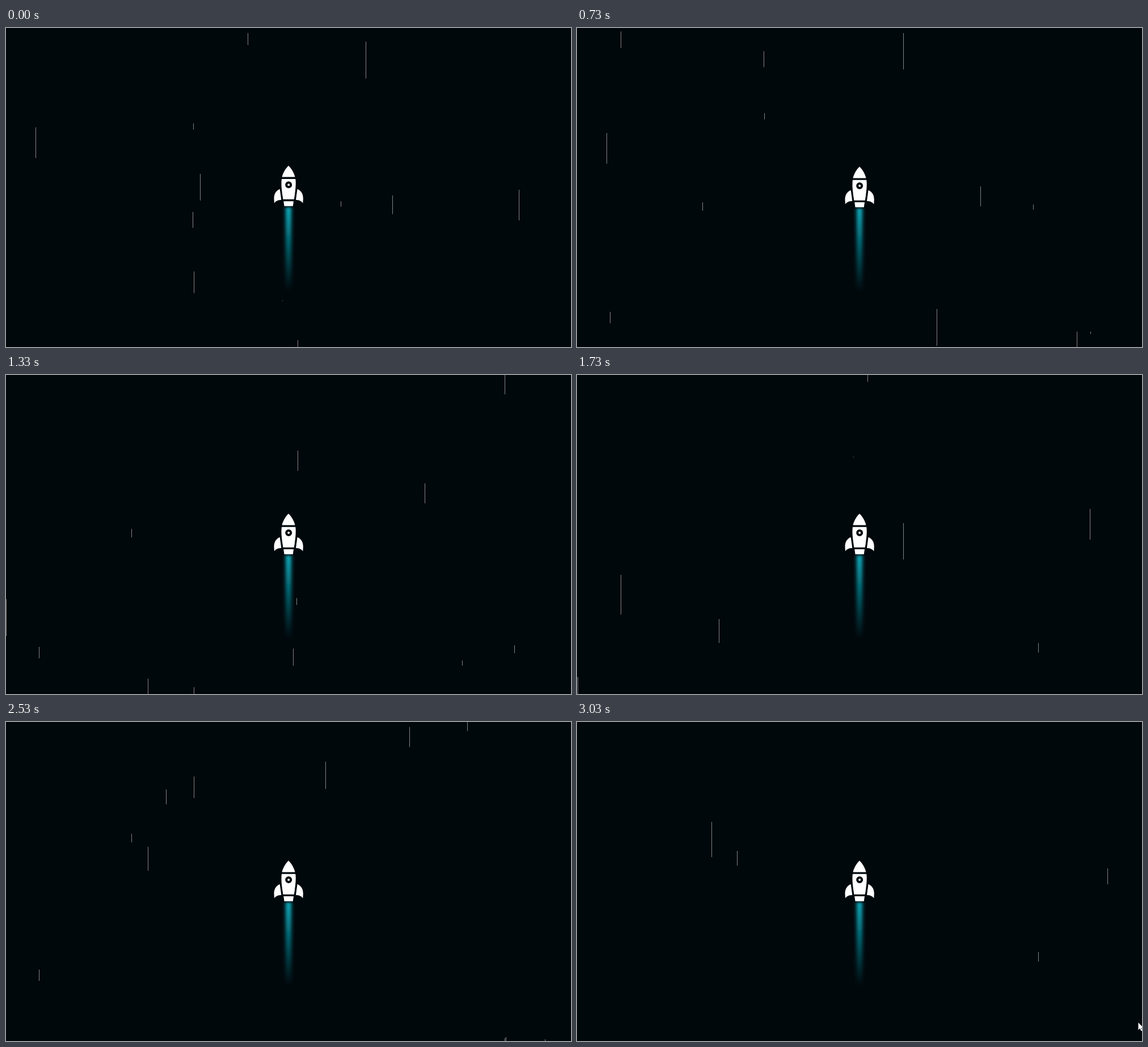
An HTML page with a canvas for the animation above (3.06 s loop, 996x562 px).

```html
<!DOCTYPE html>
<html lang="en">
<head>
<meta charset="utf-8">
<title>Rocket</title>
<style>
  html, body { margin: 0; width: 100%; height: 100%; overflow: hidden; background: #01080c; }
  canvas, svg { position: absolute; left: 0; top: 0; width: 996px; height: 562px; display: block; }
</style>
</head>
<body>
<canvas id="sky" width="996" height="562"></canvas>
<svg viewBox="0 0 996 562">
  <defs>
    <linearGradient id="fade" x1="0" y1="0" x2="0" y2="1">
      <stop offset="0" stop-color="#0ab4c6"/>
      <stop offset="1" stop-color="#0ab4c6" stop-opacity="0"/>
    </linearGradient>
    <filter id="soft" x="-150%" y="-10%" width="400%" height="120%">
      <feGaussianBlur stdDeviation="3 2"/>
    </filter>
  </defs>
  <g id="rocket">
    <rect x="493" y="318" width="10" height="146" fill="url(#fade)" filter="url(#soft)"/>
    <g fill="#fff">
      <path d="M498 244.3C503 249.3 507.500 256 509.500 264.400H486.500C488.500 256 493 249.300 498 244.300Z"/>
      <path d="M486 267.800H510.300C511.500 277 510.300 288 507.800 303.700H488.400C486 288 484.700 277 486 267.800Z"/>
      <path id="fin" d="M482.700 285.700C475.500 288.700 472.300 295 472.500 303L473 310.500C476 306.200 480 305 485.300 304.700Z"/>
      <use href="#fin" transform="translate(996.300) scale(-1 1)"/>
      <path d="M489.300 307.100H507L505.800 315.700H490.500Z"/>
    </g>
    <circle cx="498.200" cy="278" r="4" fill="#fff" stroke="#01080c" stroke-width="4"/>
  </g>
  <path id="pointer" d="M0 0V13L3 10.300L5 15L7.200 14L5.200 9.500H9Z" fill="#fff"/>
</svg>
<script>
  const WIDTH = 996, HEIGHT = 562;
  const LOOP = 3060, STEPS = 92, STEPS_PER_MS = 0.03;
  const TRACK = HEIGHT * 5;   // distance a streak falls before it starts over
  const LEAD = 175;           // how far above the stage it starts
  const AGE = 200;            // steps the streaks have fallen before the loop

  let seed = 7;
  function random() {
    seed = (seed * 16807) % 2147483647;
    return seed / 2147483647;
  }

  // each streak falls once down its track in at most a second
  const streaks = Array.from({ length: 50 }, () => ({
    x: Math.floor(random() * WIDTH),
    len: Math.ceil(random() * 70),
    fall: 1000 * STEPS_PER_MS * (0.1 + 0.9 * random())
  }));

  const ctx = document.getElementById('sky').getContext('2d');
  const rocket = document.getElementById('rocket');
  const pointer = document.getElementById('pointer');

  function drawStreaks(step) {
    ctx.clearRect(0, 0, WIDTH, HEIGHT);
    ctx.fillStyle = 'rgba(255,255,255,.5)';
    for (const { x, len, fall } of streaks) {
      const top = ((step + AGE) / fall % 1) * TRACK - LEAD;
      ctx.fillRect(x, Math.round(top), 1, len);
    }
  }

  function draw(step) {
    drawStreaks(step);

    // the rocket trembles once every three steps
    const shake = 1.07 * Math.cos((step - 1.15) * 2 * Math.PI / 3) - 1.03;
    rocket.setAttribute('transform', `translate(0 ${shake})`);

    // the mouse pointer slides in at the right edge
    const left = STEPS - 1 - step;
    pointer.setAttribute('transform', `translate(${989.5 + left * 4} 529.5)`);
  }

  const start = performance.now();
  function tick() {
    const t = Math.max(0, performance.now() - start) % LOOP;
    draw(Math.min(STEPS - 1, Math.floor((t + 4) * STEPS_PER_MS)));
    requestAnimationFrame(tick);
  }
  tick();
</script>
</body>
</html>
```
